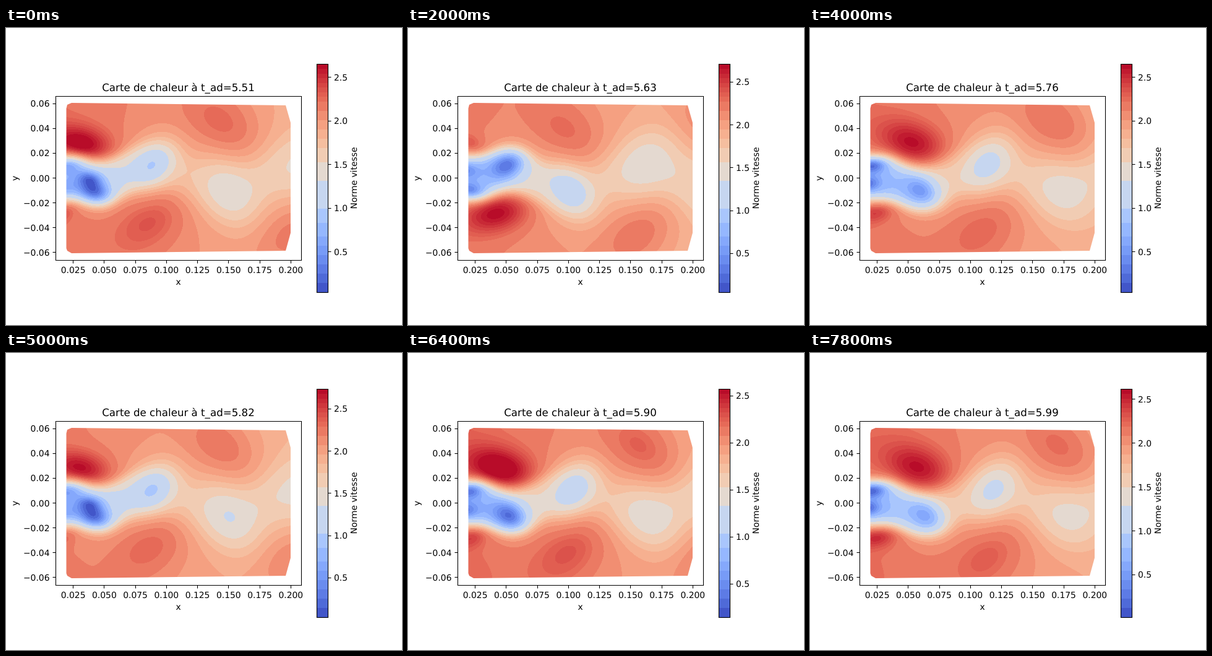
Animation of 640x480 px, one loop 8000 ms. Source, as an HTML page with a canvas:

```html
<!DOCTYPE html>
<html lang="fr">
<head>
<meta charset="utf-8">
<title>Carte de chaleur</title>
<style>
  html, body { margin: 0; width: 100%; height: 100%; overflow: hidden; background: #fff; }
  canvas, svg { position: absolute; left: 0; top: 0; }
  canvas {
    left: 97px; top: 121px;
    clip-path: polygon(.5px 9px, 2px 3px, 9px 0, 355px 4px, 363px 32px, 363px 210px,
      355px 239px, 9px 243px, 2px 239px, .5px 235px);
  }
  text { font: 13.89px "DejaVu Sans", sans-serif; text-rendering: geometricPrecision; }
  .title { font-size: 16.67px; }
  .line { fill: none; stroke: #000; stroke-width: 1.1; }
</style>
</head>
<body>
<canvas id="field" width="363" height="243"></canvas>
<svg id="chart" width="640" height="480" viewBox="0 0 640 480"></svg>
<script>
const STEP = 200, FRAMES = 40, PERIOD = 6.25, BANDS = 49;
const LEFT = 97, TOP = 121, AXIS_Y = 242;
const BAR = { x: 502.5, top: 58.5, width: 18, height: 369 };

// Colour range at a few steps: step, lowest, highest speed.
const RANGE = [[0, .032, 2.65], [6, 0, 2.737], [10, .045, 2.709], [16, .037, 2.586],
  [25, .031, 2.734], [32, .141, 2.572], [39, .014, 2.613]];

const clamp = (v, lo, hi) => Math.min(hi, Math.max(lo, v));
const bump = (v, width) => Math.exp(-((v / width) ** 2));

function rangeAt(step) {
  const i = Math.max(1, RANGE.findIndex(k => k[0] >= step));
  const [a, b] = [RANGE[i - 1], RANGE[i]];
  const f = (step - a[0]) / (b[0] - a[0]);
  return [1, 2].map(j => a[j] + (b[j] - a[j]) * f);
}

// Diverging colour scale: a parabola through three colours on each side of grey.
const BLUE = [59, 76, 192], PALE_BLUE = [141, 176, 254], GREY = [221, 221, 221];
const ORANGE = [244, 154, 123], RED = [180, 4, 38];

function scaleColor(v) {
  const [a, b, c] = v < .5 ? [BLUE, PALE_BLUE, GREY] : [GREY, ORANGE, RED];
  const t = v < .5 ? 2 * v : 2 * v - 1;
  return a.map((_, j) => Math.round(
    a[j] * (1 - t) * (1 - 2 * t) + b[j] * 4 * t * (1 - t) + c[j] * t * (2 * t - 1)));
}

// Neighbouring bands share a colour, most of all around the middle of the scale.
const groupSize = k => k < 12 ? 2 : k < 18 ? 3 : k < 24 ? 6 : k < 28 ? 4 : k < 31 ? 3 : k < 41 ? 2 : 1;
const palette = [];
while (palette.length < BANDS) {
  const start = palette.length, size = groupSize(start);
  const color = scaleColor((start + size / 2) / BANDS);
  for (let i = 0; i < size; i++) palette.push(color);
}

// Structures drifting downstream; age is counted in shedding periods.
const coreX = a => Math.max(100, 238 + 215 * a + 25 * Math.abs(a));
const coreSpeed = a =>
  .15 + 1.4 * (1 - Math.exp(-Math.max(0, a + .45) / .5)) + 2 * Math.max(0, -.75 - a);

const TRACKS = [
  { // slow vortex core
    from: -1, to: 1.2, skew: .3, x: coreX, y: () => 21, speed: coreSpeed,
    sx: a => clamp(33 + 18 * a, 22, 48), sy: a => clamp(38 + 38 * a, 12, 55)
  },
  { // opposite shear layer, merging into the core
    from: -1, to: -.45, skew: .2, x: a => coreX(a) - 8, y: a => -15 + 35 * (a + .95), speed: coreSpeed,
    sx: () => 19, sy: () => 12
  },
  { // fast stream outside the wake
    from: -.55, to: 1.7, skew: -.4,
    x: a => 120 + 138 * a + 92 * Math.abs(a),
    y: a => 55 + 35 * clamp((a - .3) / .5, 0, 1),
    speed: a => 2.26 + .44 * bump(a - .04, .35) - .2 * Math.max(0, a - 1),
    sx: a => clamp(50 + 70 * a, 16, 55), sy: a => clamp(30 + 45 * a, 18, 56)
  }
];

// Mean wake: a dead-water zone behind the body, then a weak meandering deficit.
function meanSpeed(x, y, phase) {
  const d = x - 98;
  const sway = 21 * (1 - bump(d, 60)) * Math.cos(2 * Math.PI * ((x - 237) / 232 - phase));
  const r = y - sway;
  const near = 1.2 * bump(d, 100) * Math.exp(-((r / 37) ** 4));
  return 2.21 - .00095 * d - near - .27 * bump(r, 50);
}

function speed(x, y, phase, blobs) {
  let v = meanSpeed(x, y, phase);
  for (const b of blobs) {
    const dy = y - b.y, u = (x - b.x - b.skew * dy) / b.sx, w = dy / b.sy;
    const q = u * u + w * w;
    if (q < 9) v += b.amp * Math.exp(-q);
  }
  return v;
}

// Both rows follow the same rules; the lower one is mirrored and half a period late.
function makeBlobs(phase) {
  const blobs = [];
  for (const side of [1, -1]) {
    for (let k = -2; k <= 1; k++) {
      const age = phase + k + (side < 0 ? .5 : 0);
      for (const t of TRACKS) {
        if (age < t.from || age > t.to) continue;
        blobs.push({
          x: t.x(age), y: side * t.y(age), value: t.speed(age), skew: side * t.skew,
          sx: t.sx(age), sy: t.sy(age), amp: 0
        });
      }
    }
  }
  // Tune the strengths until each centre has its own speed.
  for (let pass = 0; pass < 4; pass++) {
    for (const b of blobs) b.amp += b.value - speed(b.x, b.y, phase, blobs);
  }
  return blobs;
}

const canvas = document.getElementById("field");
const ctx = canvas.getContext("2d");
const image = ctx.createImageData(canvas.width, canvas.height);

function drawField(step, lo, hi) {
  const phase = step / PERIOD % 1, blobs = makeBlobs(phase);
  let p = 0;
  for (let j = 0; j < canvas.height; j++) {
    for (let i = 0; i < canvas.width; i++) {
      const v = (speed(LEFT + i, AXIS_Y - TOP - j, phase, blobs) - lo) / (hi - lo);
      const c = palette[clamp(Math.floor(v * BANDS), 0, BANDS - 1)];
      image.data[p++] = c[0];
      image.data[p++] = c[1];
      image.data[p++] = c[2];
      image.data[p++] = 255;
    }
  }
  ctx.putImageData(image, 0, 0);
}

const label = (x, y, s, anchor = "middle", extra = "") =>
  `<text x="${x}" y="${y}" text-anchor="${anchor}" ${extra}>${s}</text>`;
const line = d => `<path class="line" d="${d}"/>`;
const snap = v => Math.floor(v) + .5;

function buildChart() {
  let s = label(278.5, 102, "", "middle", 'class="title" id="title"');
  for (let i = 0; i < 8; i++) {
    const x = 108.62 + 50.24 * i;
    s += line(`M${snap(x)} 375.5v5`) + label(x, 396, (.025 * (i + 1)).toFixed(3));
  }
  for (let i = -3; i <= 3; i++) {
    const y = 242.5 - 40.15 * i;
    s += line(`M80.5 ${snap(y)}h-5`);
    s += label(70.5, Math.round(y + 5), (i < 0 ? "\u2212" : "") + (Math.abs(i) * .02).toFixed(2), "end");
  }
  s += line("M80.5 110.5H477.5V375.5H80.5Z");
  s += label(278.5, 415, "x");
  s += label(0, 0, "y", "middle", 'transform="translate(19 243) rotate(-90)"');
  s += label(0, 0, "Norme vitesse", "middle", 'transform="translate(567 242.5) rotate(-90)"');
  const edge = k => Math.round(BAR.top + BAR.height * (1 - k / BANDS));
  palette.forEach((c, k) => {
    const y = edge(k + 1);
    s += `<rect x="${BAR.x}" y="${y}" width="${BAR.width}" height="${edge(k) - y}" fill="rgb(${c})"/>`;
  });
  s += `<rect class="line" x="${BAR.x}" y="${BAR.top}" width="${BAR.width}" height="${BAR.height}"/>`;
  document.getElementById("chart").innerHTML = s + '<g id="ticks"></g>';
}

function drawTicks(lo, hi) {
  let s = "";
  for (let v = .5; v <= 2.5; v += .5) {
    const y = BAR.top + BAR.height * (hi - v) / (hi - lo);
    s += line(`M520.5 ${snap(y)}h5`) + label(530, Math.round(y + 5), v.toFixed(1), "start");
  }
  document.getElementById("ticks").innerHTML = s;
}

let shown = -1;
function play(now) {
  const step = Math.floor(now / STEP) % FRAMES;
  if (step !== shown) {
    shown = step;
    const [lo, hi] = rangeAt(step);
    document.getElementById("title").textContent =
      "Carte de chaleur à t_ad=" + (5.51 + .0123 * step).toFixed(2);
    drawTicks(lo, hi);
    drawField(step, lo, hi);
  }
  requestAnimationFrame(play);
}

buildChart();
play(performance.now());
</script>
</body>
</html>
```
